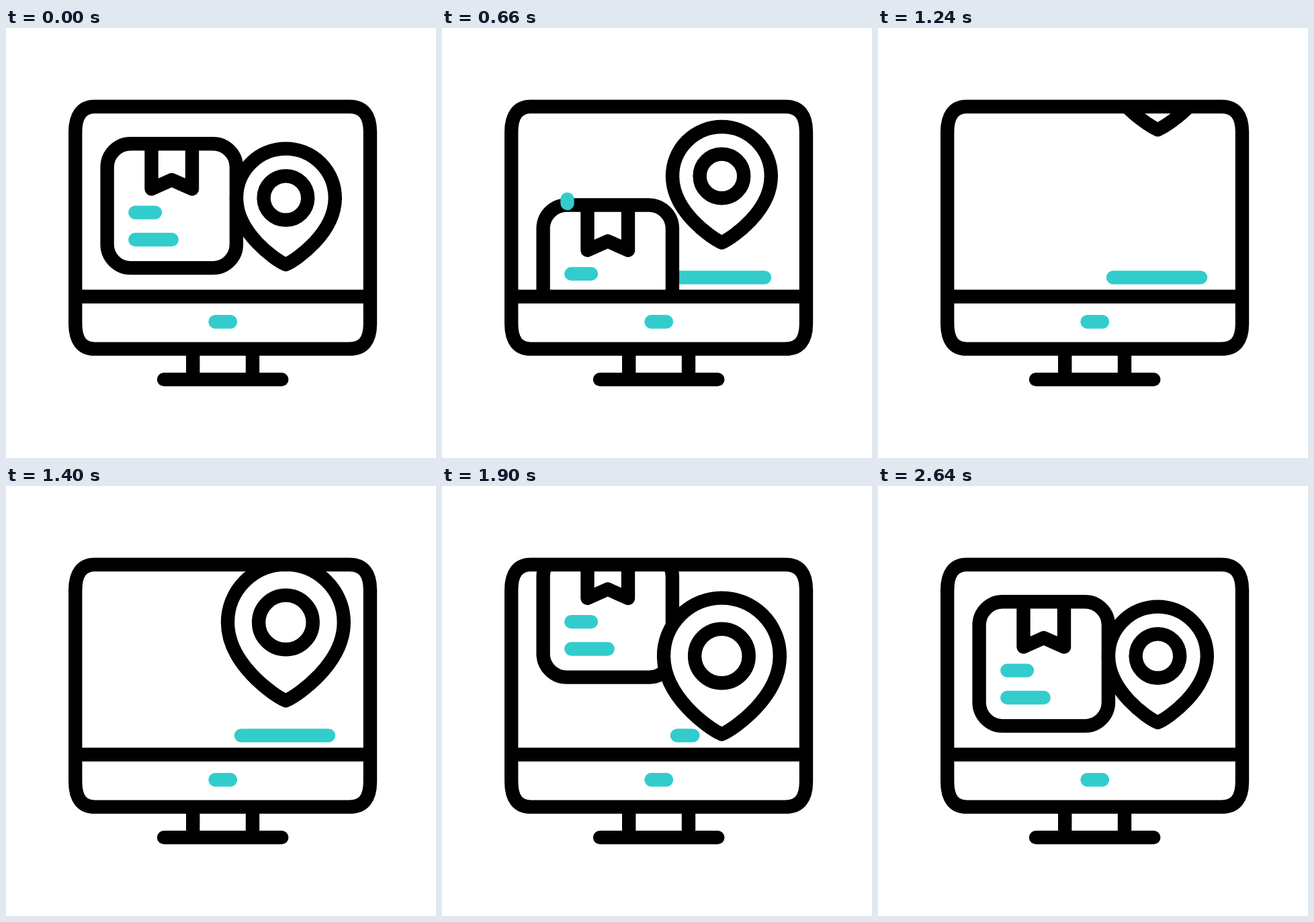
An HTML page that plays this animation: 640x640 px, repeating every 2.66 s.

```html
<!DOCTYPE html>
<html lang="en">
<head>
<meta charset="utf-8">
<title>Parcel tracking</title>
<style>
  html, body { margin: 0; width: 100%; height: 100%; overflow: hidden; background: #fff; }
  svg { display: block; width: 100%; height: 100%; }
  .ink, .teal { fill: none; stroke: #000; stroke-width: 20.4; stroke-linejoin: round; }
  .teal { stroke: #33cccc; stroke-linecap: round; }
  #body { fill: #fff; vector-effect: non-scaling-stroke; }
</style>
</head>
<body>
<svg viewBox="0 0 640 640">
  <clipPath id="screen"><rect x="103" y="117" width="439" height="283"/></clipPath>
  <g clip-path="url(#screen)">
    <path id="ground" class="teal"/>
    <g id="box">
      <rect class="ink" x="150.6" y="172.3" width="192.3" height="184.8" rx="35"/>
      <path class="ink" d="M216.5 172V239.5L246.7 226L277 239.5V172"/>
      <path class="teal" d="M192.3 274.6H222M192.3 315H246.7"/>
    </g>
    <g id="pin">
      <path id="body" class="ink" d="M0 99C-16 92-73.4 52-73.4 0A73.4 73.4 0 0 1 73.4 0C73.4 52 16 92 0 99Z"/>
      <circle id="ring" class="ink"/>
    </g>
    <path id="windA" class="teal"/>
    <path id="windB" class="teal"/>
  </g>
  <path class="ink" d="M103.2 155C103.2 130 113 117 132 117H511C532 117 542 130 542 155V440C542 465 532 477.6 511 477.6H132C113 477.6 103.2 465 103.2 440ZM103 399.8H542M278.2 478V523M367 478V523"/>
  <path class="ink" stroke-linecap="round" d="M235 523.1H410.3"/>
  <path class="teal" d="M311.5 437.3H334"/>
</svg>
<script>
const LOOP = 2660;
const el = id => document.getElementById(id);
const set = (id, name, value) => el(id).setAttribute(name, value);

// Eased progress from 0 to 1 between two times
function ease(t, from, to) {
  const x = Math.min(1, Math.max(0, (t - from) / (to - from)));
  return x * x * (3 - 2 * x);
}

// Draws the part of a straight line between two fractions of its length
function trim(id, [x1, y1, x2, y2], start, end) {
  const at = k => `${x1 + (x2 - x1) * k} ${y1 + (y2 - y1) * k}`;
  set(id, 'd', end > start ? `M${at(start)}L${at(end)}` : '');
}

function draw(t) {
  const boxY = t < 1200 ? 265 * ease(t, 440, 1000) : -250 * (1 - ease(t, 1396, 2180));
  set('box', 'transform', `translate(0 ${boxY})`);

  const pinY = t < 1100 ? -270 * ease(t, 570, 990) : -270 * (1 - ease(t, 1140, 1500));
  const grow = t < 1100 ? 0 : 1 - ease(t, 1920, 2332);
  const tilt = -5 * ease(t, 1500, 1600) + 9 * ease(t, 1600, 1700)
             - 7 * ease(t, 1700, 1800) + 3 * ease(t, 1800, 1900);
  const scale = 1 + 0.177 * grow;
  set('pin', 'transform', `translate(416.4 ${253 + pinY}) rotate(${tilt} 0 ${99 * scale})`);
  set('body', 'transform', `scale(${scale})`);
  set('ring', 'r', 32.8 + 7.5 * grow);

  trim('ground', [350, 371.4, 480, 371.4], 0, ease(t, 220, 620) - ease(t, 1609, 2009));
  trim('windA', [186.5, 261, 185.8, 175], ease(t, 800, 1090), ease(t, 625, 845));
  trim('windB', [235.3, 318, 233.5, 197], ease(t, 850, 1140), ease(t, 700, 910));
}

const begin = performance.now();
function frame() {
  draw((performance.now() - begin) % LOOP);
  requestAnimationFrame(frame);
}
frame();
</script>
</body>
</html>
```
